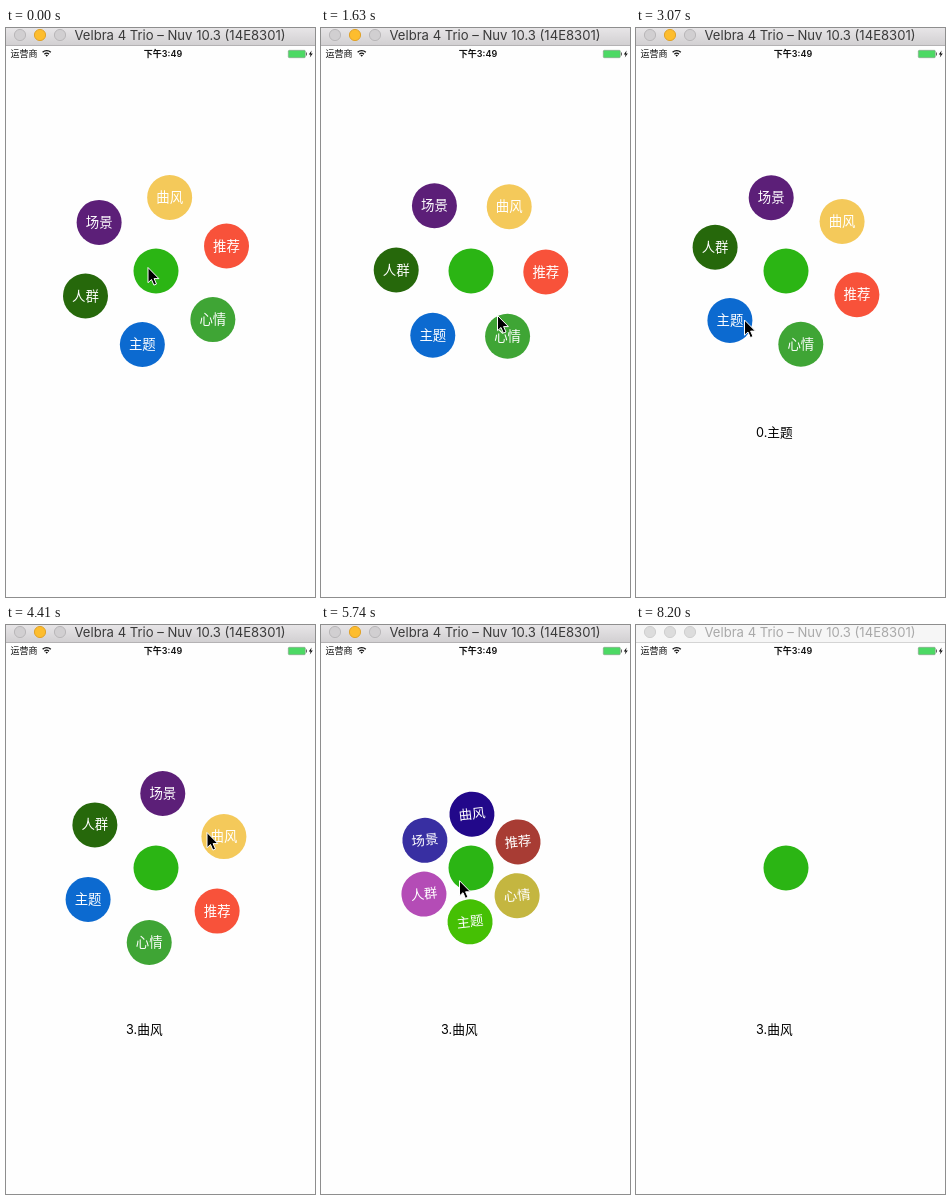
An HTML page that plays this animation: 309x569 px, repeating every 8.3 s.

```html
<!DOCTYPE html>
<html lang="zh">
<head>
<meta charset="utf-8">
<title>Radial menu</title>
<style>
  html, body { margin: 0; width: 100%; height: 100%; overflow: hidden; background: #fefefe; }
  svg { display: block; width: 309px; height: 569px; }
  text { font-family: "Noto Sans CJK SC", "Noto Sans CJK", "Noto Sans CJK JP", sans-serif; }
  .item text { font-size: 13.4px; fill: #fff; text-anchor: middle; }
  #title { font: 13.1px Inter, "Open Sans", sans-serif; }
  .status { font-size: 9px; fill: #111; }
  .digits { font-family: Inter, sans-serif; font-weight: 600; }
  #label { font-size: 12.7px; fill: #000; }
  #label .num { font-family: Inter, sans-serif; }
</style>
</head>
<body>
<svg viewBox="0 0 309 569">
  <defs>
    <linearGradient id="chrome" x2="0" y2="1">
      <stop offset="0" stop-color="#e7e5e7"/>
      <stop offset="1" stop-color="#d2d0d2"/>
    </linearGradient>
  </defs>
  <rect width="309" height="569" fill="#fefefe"/>

  <rect id="bar" width="309" height="17"/>
  <rect id="edge" y="17" width="309" height="1"/>
  <g id="lights" stroke-width="1">
    <circle cx="14" cy="7" r="5.6"/>
    <circle cx="34" cy="7" r="5.6"/>
    <circle cx="54" cy="7" r="5.6"/>
  </g>
  <text id="title" x="68.5" y="12">Velbra 4 Trio – Nuv 10.3 (14E8301)</text>

  <text class="status" x="4.5" y="29">运营商</text>
  <g fill="none" stroke="#111" stroke-width="1.3">
    <path d="M36.6 24.3A6 6 0 0 1 44.8 24.3"/>
    <path d="M38.4 26.2A3.4 3.4 0 0 1 43 26.2"/>
  </g>
  <path d="M39.4 27.3Q40.7 26.3 42 27.3L40.7 28.8Z" fill="#111"/>
  <text class="status" x="157" y="29" text-anchor="middle" font-weight="600">下午<tspan class="digits">3:49</tspan></text>
  <rect x="282.3" y="22.3" width="17" height="7.4" rx="1" fill="#4cd964" stroke="#8a9a8c" stroke-width=".6"/>
  <path d="M300 24.6h.9v2.8h-.9z" fill="#555"/>
  <path d="M305.6 22.5L302.8 26.5H304.6L303.8 29.6L306.8 25.4H305Z" fill="#111"/>

  <g id="ring"></g>
  <circle cx="150" cy="243" r="22.5" fill="#2bb514"/>
  <text id="label" x="120" y="409"><tspan class="num"></tspan><tspan></tspan></text>
  <path id="cursor" d="M0 0V15.2L3.5 12L5.9 17.6L8.5 16.5L6.1 11.1H10.9Z" fill="#000" stroke="#fff" stroke-width="1" stroke-linejoin="round"/>
</svg>
<script>
const LOOP = 8300, CX = 150, CY = 243, ORBIT = 74.8, SPIN = 0.0124;

// name, first colour, second colour; clockwise in 60 degree slots
const ITEMS = [
  ['推荐', '#f8523a', '#a83c34'],
  ['心情', '#3fa535', '#c4b640'],
  ['主题', '#0c6ad0', '#45c004'],
  ['人群', '#26680b', '#b44cb6'],
  ['场景', '#5c1f78', '#382fa2'],
  ['曲风', '#f4c95a', '#22088a']
];
const FOLD = 820, UNFOLD = 300;
const FOLD1 = 4780, REOPEN = 5600, TURN2 = 5660, FOLD2 = 6426;
const LABELS = [[0, '', ''], [1850, '1.', '心情'], [2850, '0.', '主题'], [4100, '3.', '曲风']];
// time, x, y of the pointer tip
const POINTER = [
  [0, 142, 239.5], [700, 142, 239.5], [1450, 176.5, 287.5], [2050, 176.5, 287.5],
  [2750, 108.5, 292], [3200, 108.5, 292], [3950, 201, 207.5], [4420, 201, 207.5],
  [4720, 138.5, 255.7], [6900, 138.5, 255.7], [7780, 279, 564]
];
const LEAVE = 7800, BLUR = 8200;

const $ = id => document.getElementById(id);
const clamp = v => Math.max(0, Math.min(1, v));
const smooth = v => v * v * (3 - 2 * v);
const span = (t, start, length) => clamp((t - start) / length);

function make(tag, attrs, parent) {
  const el = document.createElementNS('http://www.w3.org/2000/svg', tag);
  for (const k in attrs) el.setAttribute(k, attrs[k]);
  return parent.appendChild(el);
}

const nodes = ITEMS.map(([name]) => {
  const g = make('g', { class: 'item' }, $('ring'));
  const disc = make('circle', { r: 22.5 }, g);
  make('text', { y: 4.6 }, g).textContent = name;
  return { g, disc };
});

function ringState(t) {
  if (t < REOPEN) {
    return {
      set: 1, tilt: 0,
      angle: -19.5 + SPIN * Math.min(t, FOLD1),
      radius: ORBIT * (1 - smooth(span(t, FOLD1, FOLD)))
    };
  }
  const open = 1 - (1 - span(t, REOPEN, UNFOLD)) ** 2;
  return {
    set: 2, tilt: -6.5,
    angle: -30 + SPIN * Math.max(0, Math.min(t, FOLD2) - TURN2),
    radius: ORBIT * open * (1 - smooth(span(t, FOLD2, FOLD)))
  };
}

function drawRing(t) {
  const { set, tilt, angle, radius } = ringState(t);
  nodes.forEach(({ g, disc }, i) => {
    const a = (angle + i * 60) * Math.PI / 180;
    const x = CX + radius * Math.cos(a), y = CY + radius * Math.sin(a);
    g.setAttribute('transform', `translate(${x} ${y}) rotate(${tilt})`);
    disc.setAttribute('fill', ITEMS[i][set]);
  });
  $('ring').style.display = radius < 0.5 ? 'none' : '';
}

function drawPointer(t) {
  const n = POINTER.findIndex(p => p[0] > t);
  const b = POINTER[n < 0 ? POINTER.length - 1 : n];
  const a = n > 0 ? POINTER[n - 1] : b;
  const p = a === b ? 1 : smooth(span(t, a[0], b[0] - a[0]));
  const x = a[1] + (b[1] - a[1]) * p, y = a[2] + (b[2] - a[2]) * p;
  $('cursor').setAttribute('transform', `translate(${x} ${y})`);
  $('cursor').style.display = t < LEAVE ? '' : 'none';
}

function drawWindow(t) {
  const active = t < BLUR;
  $('bar').setAttribute('fill', active ? 'url(#chrome)' : '#f6f6f6');
  $('edge').setAttribute('fill', active ? '#b4b2b4' : '#d4d4d4');
  $('title').setAttribute('fill', active ? '#3a3a3a' : '#a9a9a9');
  [...$('lights').children].forEach((light, i) => {
    const lit = active && i === 1;
    light.setAttribute('fill', lit ? '#fdbd2e' : active ? '#d1cfd1' : '#dcdcdc');
    light.setAttribute('stroke', lit ? '#e0a229' : active ? '#b9b7b9' : '#cfcfcf');
  });
}

function drawLabel(t) {
  const [, num, name] = LABELS.filter(l => l[0] <= t).pop();
  const [a, b] = $('label').children;
  a.textContent = num;
  b.textContent = name;
}

function frame() {
  const t = performance.now() % LOOP;
  drawRing(t);
  drawPointer(t);
  drawWindow(t);
  drawLabel(t);
  requestAnimationFrame(frame);
}
frame();
</script>
</body>
</html>
```
